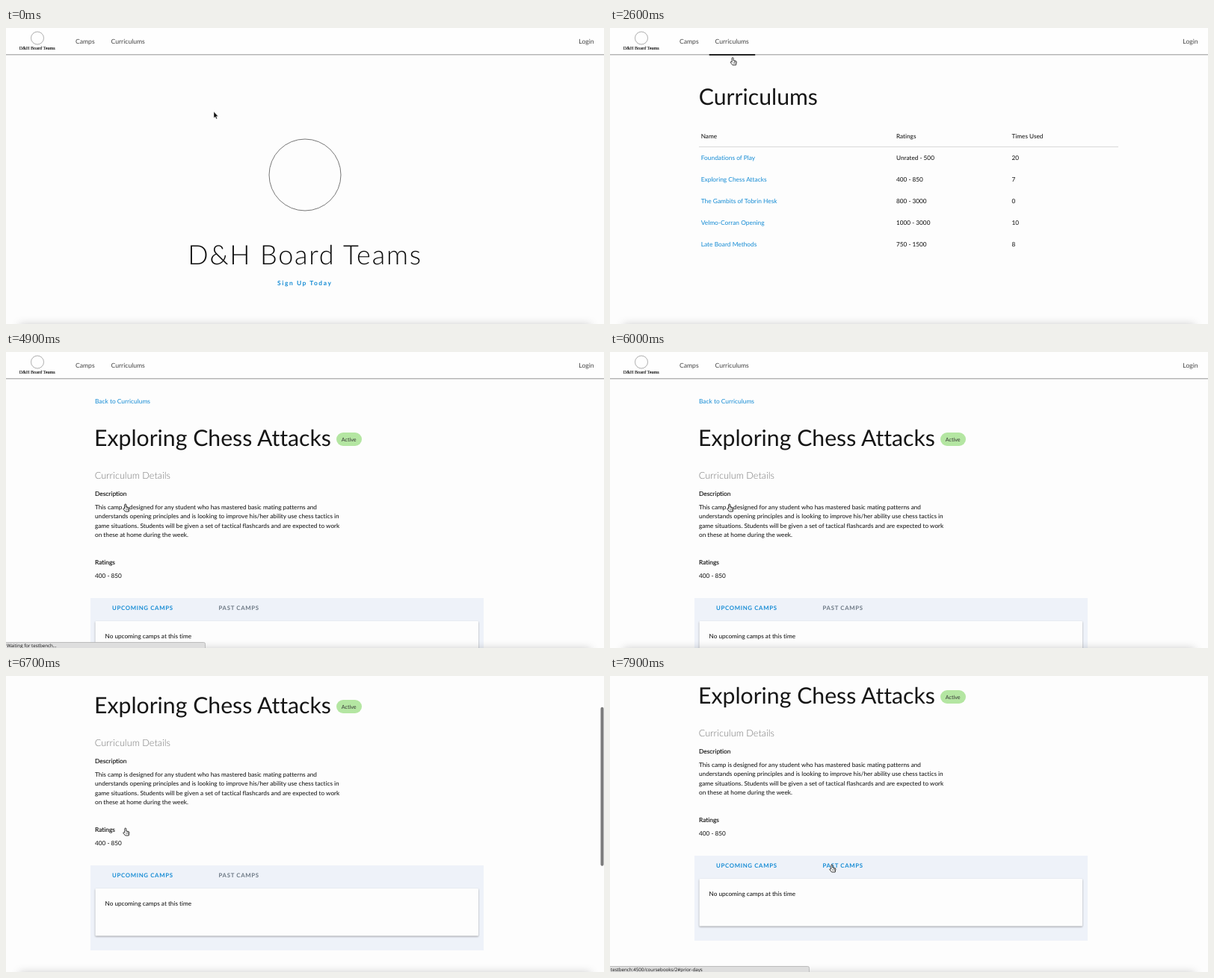
An HTML page for the animation above (8 s loop, 800x397 px).

```html
<!DOCTYPE html>
<html lang="en">
<head>
<meta charset="utf-8">
<title>Curriculums</title>
<style>
  html, body { margin: 0; width: 100%; height: 100%; overflow: hidden; background: #fdfdfd; }
  svg { display: block; width: 800px; height: 397px; overflow: hidden; }
  text { font: 8.23px Lato, sans-serif; font-variant-ligatures: none; fill: #0c0c0c; text-rendering: geometricPrecision; white-space: pre; }
  .nav { font-size: 8.6px; fill: #444; }
  .brand { font: 6.2px "Liberation Serif", serif; fill: #000; stroke: #000; stroke-width: .12; }
  .hero { font-size: 36px; font-weight: 300; letter-spacing: 1.8px; text-anchor: middle; }
  .signup { font-size: 8.4px; font-weight: 700; letter-spacing: 1.6px; fill: #148bd4; }
  .title { font-size: 30.2px; fill: #161616; }
  .sub { font-size: 12.7px; font-weight: 300; fill: #777; }
  .label { font-size: 8.4px; stroke: #0c0c0c; stroke-width: .12; }
  .link { font-size: 8.4px; fill: #148bd4; }
  .tab { font-size: 7.8px; font-weight: 700; letter-spacing: .67px; fill: #6c7884; }
  .tab.on { fill: #148bd4; }
  .badge { font-size: 7.2px; fill: #333; }
  .status { font: 6.2px "Open Sans", sans-serif; fill: #111; }
  .mark { fill: none; stroke: #777; }
  .card { filter: drop-shadow(0 1.2px .8px rgba(0, 0, 0, .35)); }
  .headline { filter: drop-shadow(0 .5px .5px rgba(0, 0, 0, .2)); }
  .glow { filter: blur(6px); }
</style>
</head>
<body>
<svg viewBox="0 0 800 397">
  <rect width="800" height="397" fill="#fdfdfd"/>
  <g id="view">
    <g id="home">
      <circle class="mark" cx="400" cy="197" r="48"/>
    </g>
    <g id="list">
      <path d="M119 159.3H680" stroke="#d6d6d6"/>
    </g>
    <g id="detail">
      <rect x="442" y="108" width="34" height="18" rx="9" fill="#b4e6a2"/>
      <rect x="113" y="330" width="526" height="114" fill="#eef2f9"/>
      <rect class="card" x="119.500" y="361" width="512.500" height="63.500" rx="1" fill="#fdfdfd"/>
    </g>
    <g id="header">
      <rect width="800" height="35" fill="#fefefe"/>
      <rect class="headline" y="35" width="800" height="1.300" fill="#b4b4b4"/>
      <circle class="mark" cx="42" cy="13.500" r="8.500" stroke-width=".6"/>
      <rect id="underline" x="132.700" y="35" width="61.500" height="1.800" fill="#111"/>
    </g>
  </g>
  <rect class="glow" x="18" y="398" width="764" height="40" fill="#000" fill-opacity=".22"/>
  <rect id="thumb" x="795.500" width="4" height="213" rx="2" fill="#7a7a7a"/>
  <g id="status">
    <path d="M-1 398V389.500H264.500Q266.500 389.500 266.500 391.500V398Z" fill="#dedede" stroke="#b2b2b2" stroke-width=".8"/>
  </g>
  <g id="cursor">
    <path id="arrow" d="M0 .3V8.800L1.900 7.100 3.200 10 4.500 9.400 3.300 6.500H5.800Z" fill="#111" stroke="#fff" stroke-width=".4"/>
    <g id="hand" stroke="#222" stroke-width=".9" stroke-linejoin="round">
      <path d="M-1.200 6V1A1 1 0 0 1 .8 1V4L3.800 4.500Q5 4.800 4.900 6.200L4.200 10H-.4L-3 6.800Q-3.500 5.800 -2.500 5.600Z" fill="#fff"/>
      <path d="M.7 6.200V8.300M2.100 4.300V8.300M3.500 4.600V8.300" fill="none" stroke-width=".5"/>
    </g>
  </g>
</svg>
<script>
const LOOP = 8000, STEP = 100;
const $ = id => document.getElementById(id);

function write(parent, x, y, label, style = '') {
  const node = document.createElementNS('http://www.w3.org/2000/svg', 'text');
  node.setAttribute('x', x);
  node.setAttribute('y', y);
  node.setAttribute('class', style);
  node.textContent = label;
  return $(parent).appendChild(node);
}

write('header', 17.7, 29.3, 'D&H Board Teams', 'brand');
write('header', 93, 20.5, 'Camps', 'nav');
write('header', 140.5, 20.5, 'Curriculums', 'nav');
write('header', 766.3, 20.5, 'Login', 'nav');

write('home', 400, 316.5, 'D&H Board Teams', 'hero');
write('home', 363, 345, 'Sign Up Today', 'signup');

const rows = [
  ['Name', 'Ratings', 'Times Used'],
  ['Foundations of Play', 'Unrated - 500', '20'],
  ['Exploring Chess Attacks', '400 - 850', '7'],
  ['The Gambits of Tobrin Hesk', '800 - 3000', '0'],
  ['Velmo-Corran Opening', '1000 - 3000', '10'],
  ['Late Board Methods', '750 - 1500', '8']
];
const columns = [121.7, 383, 537.5];
write('list', 118.8, 102.5, 'Curriculums', 'title');
rows.forEach((row, r) => row.forEach((cell, c) =>
  write('list', columns[c], 148 + r * 29 + (r ? .2 : 0), cell, r && !c ? 'link' : '')));

write('detail', 119, 69, 'Back to Curriculums', 'link');
write('detail', 118, 125.7, 'Exploring Chess Attacks', 'title');
write('detail', 448.7, 119.8, 'Active', 'badge');
write('detail', 118.7, 169.5, 'Curriculum Details', 'sub');
write('detail', 119, 193.3, 'Description', 'label');
[
  'This camp is designed for any student who has mastered basic mating patterns and',
  'understands opening principles and is looking to improve his/her ability use chess tactics in',
  'game situations. Students will be given a set of tactical flashcards and are expected to work',
  'on these at home during the week.'
].forEach((line, i) => write('detail', 119, 211.2 + i * 12.25, line));
write('detail', 119, 285, 'Ratings', 'label');
write('detail', 119, 303.2, '400 - 850');
write('detail', 142, 345.8, 'UPCOMING CAMPS', 'tab on');
const pastTab = write('detail', 284.5, 345.8, 'PAST CAMPS', 'tab');
write('detail', 132.5, 383.7, 'No upcoming camps at this time');

const statusText = write('status', 1, 395.8, '', 'status');

// Interpolated tracks: time, then values
const pointer = [
  [200, 278, 112], [400, 260, 97], [600, 215, 60], [800, 171, 25], [900, 166, 19],
  [1500, 166, 19], [1600, 165, 19], [2400, 165, 19], [2700, 164, 50], [3000, 161, 140],
  [3200, 160, 174], [3400, 160, 183], [3600, 159.5, 192.5], [3900, 160, 204],
  [7200, 160, 204], [7400, 205, 222], [7600, 277, 246], [7800, 297, 253]
];
const scroll = [
  [6000, 0], [6100, 3], [6200, 10], [6300, 21], [6400, 34], [6500, 50], [6600, 64],
  [6700, 76], [6800, 83], [6900, 86], [7000, 88], [7100, 89]
];
const thumbFade = [[6000, 0], [6100, 1], [7300, 1], [7600, 0]];

// Hard changes: time, state
const host = 'testbench:4500/coursebooks';
const waiting = 'Waiting for testbench...';
const pages = [[0, 'home'], [2400, 'list'], [4900, 'detail']];
const shapes = [
  [0, 'arrow'], [1600, 'hand'], [2700, 'arrow'], [3200, 'hand'],
  [3500, 'arrow'], [3800, 'hand'], [7300, 'arrow'], [7700, 'hand']
];
const messages = [
  [0, ''], [1700, host], [2000, waiting], [2400, ''], [3200, host + '/1'],
  [3800, host + '/2'], [4500, waiting], [5100, ''], [7700, host + '/2#prior-days']
];

const pick = (table, t) => table.filter(row => row[0] <= t).pop()[1];
const show = (id, on) => $(id).setAttribute('visibility', on ? 'visible' : 'hidden');

function at(track, t) {
  const i = track.findIndex(key => key[0] > t);
  if (i < 1) return (i ? track[track.length - 1] : track[0]).slice(1);
  const a = track[i - 1], b = track[i], k = (t - a[0]) / (b[0] - a[0]);
  return a.slice(1).map((v, n) => v + (b[n + 1] - v) * k);
}

function draw(t) {
  const page = pick(pages, t), shape = pick(shapes, t), message = pick(messages, t);
  const [x, y] = at(pointer, t), [top] = at(scroll, t);
  pages.forEach(([, id]) => show(id, id === page));
  ['arrow', 'hand'].forEach(id => show(id, id === shape));
  show('underline', t >= 1600 && t < 2700);
  show('status', message);
  statusText.textContent = message;
  pastTab.classList.toggle('on', t >= 7700);
  $('view').setAttribute('transform', `translate(0 ${-top})`);
  $('cursor').setAttribute('transform', `translate(${x} ${y})`);
  $('thumb').setAttribute('y', .7 + top * .54);
  $('thumb').setAttribute('opacity', at(thumbFade, t)[0]);
}

const start = performance.now();
function tick() {
  const t = (performance.now() - start) % LOOP;
  draw(Math.floor(t / STEP) * STEP);
  requestAnimationFrame(tick);
}
tick();
</script>
</body>
</html>
```
